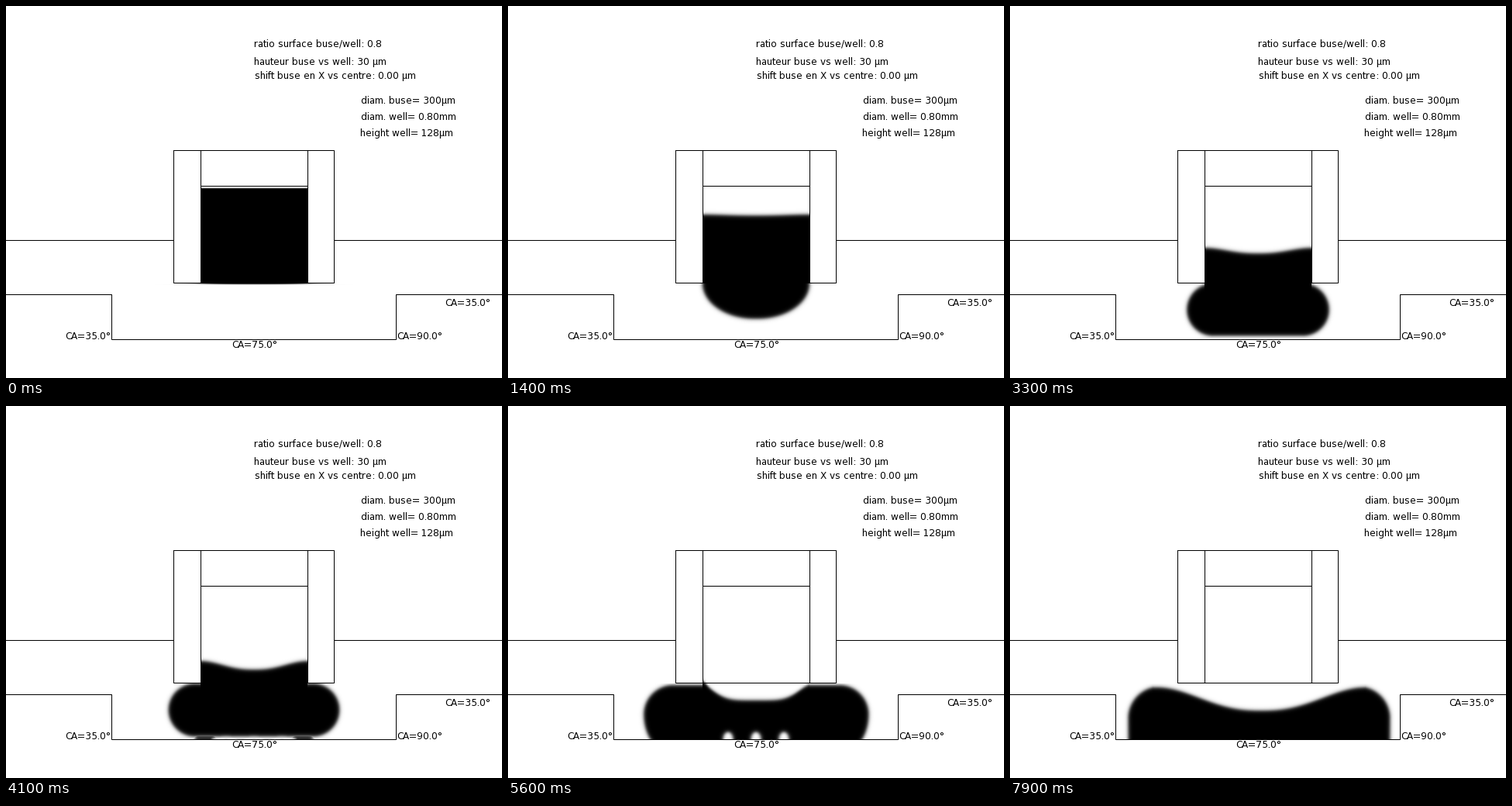
These frames come from a looping animation (640x480 px, 8000 ms). A matplotlib script:

```python
import numpy as np
import matplotlib.pyplot as plt
from matplotlib.animation import FuncAnimation

plt.rcParams["text.hinting_factor"] = 1   # whole-pixel letter advances

W, H, STEP, FRAMES = 640, 480, 100, 80
CX, HALF = 320, 69                    # nozzle axis and bore half-width
TIP, FLOOR, Y0 = 358, 430, 228        # nozzle tip, well floor, first liquid row

X, Y = np.meshgrid(np.arange(W) + 0.5, np.arange(Y0, FLOOR) + 0.5)
OPEN = (Y > TIP) | (abs(X - CX) < HALF)


def ease(t, start, length):
    u = np.clip((t - start) / length, 0, 1)
    return u * u * (3 - 2 * u)


def soft(d, s):
    return 1 / (1 + np.exp(-np.clip(d / s, -40, 40)))


def ellipse(dx, dy, rx, ry):
    """Approximate signed distance, positive inside."""
    k = np.hypot(dx / rx, dy / ry)
    slope = np.hypot(dx / rx**2, dy / ry**2) / np.maximum(k, 1e-6)
    return (1 - k) / np.maximum(slope, 1e-4)


def drop(t, s):
    """Liquid hanging below the nozzle, then spreading over the well."""
    cx = CX + 1.5 * ease(t, 5, 2)
    cy = TIP + 34 * ease(t, 1.5, 1.7) + 11 * ease(t, 3.8, 3.4)
    hw = np.clip(HALF + 23.2 * (t - 2.32), HALF, 169)
    r = HALF - 35 * ease(t, 1.1, 2) + 7 * ease(t, 4, 3)
    low = TIP + 68.5 * (1 - np.exp(-0.64 * t**1.6))
    down = max(low - cy + 180 * max((t - 4) / 3.2, 0) ** 3, 1)

    dx = np.maximum(abs(X - cx) - hw + r, 0)
    body = soft(ellipse(dx, Y - cy, r, np.where(Y < cy, r, down)), s)
    neck = (abs(X - CX) < HALF) & (Y < cy)
    return np.maximum(body, neck)


def surface(t):
    """Height of the upper meniscus in each column."""
    edge = min(235 + 25 * t - 0.5 * t * t, 363)
    depth = min(0.65 * t * t, 30)
    late = ease(t, 5.4, 1.6)
    width = HALF + 66 * late
    power = 1.2 + np.exp(-((t - 5.6) / 0.6) ** 2)
    u = np.minimum(abs(X - CX - 4 * late) / width, 1) ** power
    cling = 5 * max(1 - abs(t - 5.6) / 0.3, 0) * np.exp(-((X - 250) / 7) ** 2)
    return edge + depth * (1 + np.cos(np.pi * u)) / 2 - cling


def liquid(t):
    s = 0.4 + min(2.5 * t, 1)
    body = drop(t, s)

    # first contacts with the floor
    feet = soft(13 - abs(abs(X - CX) - 63), s) * soft(Y - 424, s)
    body = np.maximum(body, 0.9 * ease(t, 3.8, 0.35) * feet)
    body = np.minimum(body, soft(Y - surface(t), s))

    # shrinking air pockets
    r, h = 18 - 7.7 * (t - 4.1), 4 + 3.3 * (t - 4.1)
    if t > 4 and r > 1:
        for c in (-36, 0, 36):
            body = np.minimum(body, soft(-ellipse(X - CX - c, Y - FLOOR, r, h), s))
    return 1 - body * OPEN


fig = plt.figure(figsize=(W / 100, H / 100), dpi=100, facecolor="white")
ax = fig.add_axes([0, 0, 1, 1])
ax.axis("off")
img = ax.imshow(liquid(0), cmap="gray", vmin=0, vmax=1, interpolation="nearest",
                extent=(0, W, FLOOR, Y0), aspect="auto")
ax.set(xlim=(0, W), ylim=(H, 0))


def line(*pts):
    ax.plot(*zip(*pts), color="black", lw=0.72, solid_joinstyle="miter")


line((216, 186), (423, 186), (423, 357), (216, 357), (216, 186))
line((251, 186), (251, 357))
line((389, 186), (389, 357))
line((251, 232), (389, 232))
line((0, 302), (216, 302))
line((423, 302), (W, 302))
line((0, 372), (136, 372), (136, 430), (503, 430), (503, 372), (W, 372))

LABELS = [
    (320, 53, "ratio surface buse/well: 0.8"),
    (320, 76, "hauteur buse vs well: 30 µm"),
    (321, 94, "shift buse en X vs centre: 0.00 µm"),
    (458, 126, "diam. buse= 300µm"),
    (458, 147, "diam. well= 0.80mm"),
    (457, 168, "height well= 128µm"),
    (566, 387, "CA=35.0°"),
    (76, 430, "CA=35.0°"),
    (291, 441, "CA=75.0°"),
    (504, 430, "CA=90.0°"),
]
for x, y, text in LABELS:
    ax.text(x, y, text, family="DejaVu Sans", size=8.64, va="baseline")


def update(i):
    img.set_data(liquid(i * STEP / 1000))
    return [img]


anim = FuncAnimation(fig, update, frames=FRAMES, interval=STEP, repeat=True, repeat_delay=0)
plt.show()
```
